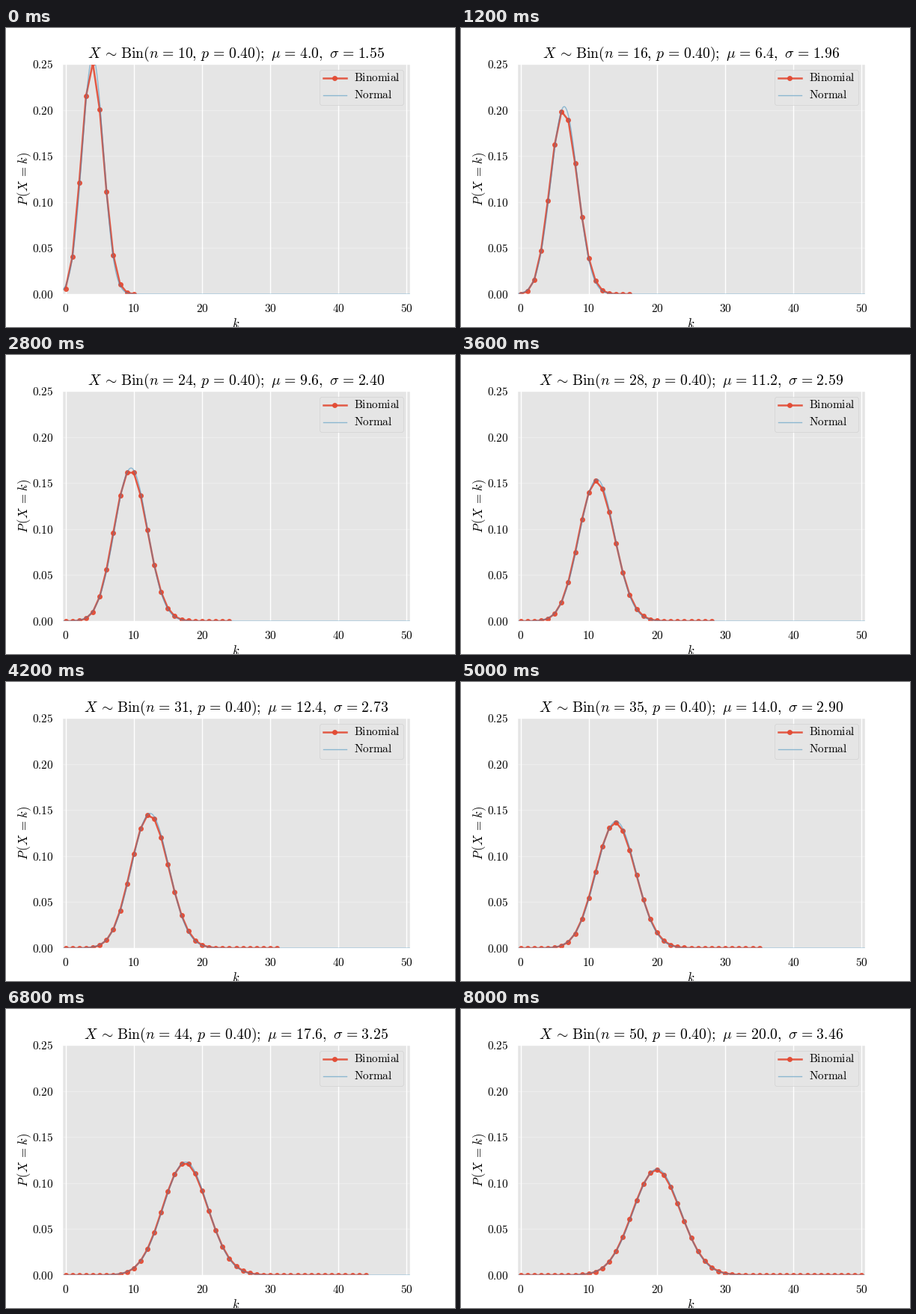
Recreate the animation shown at these times as a matplotlib script. Size 600x400 px, loop 8.2 s.

```python
from math import comb, pi, sqrt

import matplotlib.pyplot as plt
import numpy as np
from matplotlib.animation import FuncAnimation

P = 0.4
N_MIN, N_MAX = 10, 50
STEP_MS = 200
RED, BLUE, PANEL = "#E24A33", "#348ABD", "#E5E5E5"

plt.rcParams["mathtext.fontset"] = "cm"

# TeX-like spacing around relations and after slanted capitals
GAP = r"\hspace{0.117}"
EQ = f"{GAP}={GAP}"
X = r"X\hspace{0.09}"


def roman(text):
    return rf"$\mathrm{{{text}}}$"


def binomial(n):
    return [comb(n, k) * P**k * (1 - P) ** (n - k) for k in range(n + 1)]


def normal(x, mu, sigma):
    return np.exp(-(((x - mu) / sigma) ** 2) / 2) / (sigma * sqrt(2 * pi))


def title_text(n, mu, sigma):
    return (
        rf"${X}{GAP}\sim{GAP}\mathrm{{Bin}}(n{EQ}{n},\hspace{{0.18}}p{EQ}{P:.2f});"
        rf"\ \mu{EQ}{mu:.1f},\ \sigma{EQ}{sigma:.2f}$"
    )


fig, ax = plt.subplots(figsize=(6, 4), dpi=100)
ax.set_facecolor(PANEL)
ax.set_axisbelow(True)
ax.set(xlim=(-0.5, 50.5), ylim=(0, 0.25))
ax.spines[:].set(color="white", linewidth=1)

xticks = np.arange(0, 51, 10)
yticks = np.arange(0, 0.26, 0.05)
ax.set_xticks(xticks, [roman(f"{x}") for x in xticks])
ax.set_yticks(yticks, [roman(f"{y:.2f}") for y in yticks])
ax.tick_params(length=0, pad=8.5, labelsize=11)
ax.grid(axis="x", color="white", linewidth=1)
ax.grid(axis="y", color="white", linewidth=1, alpha=0.3)

ax.set_xlabel("$k$", fontsize=12, labelpad=2.8)
ax.set_ylabel(rf"$P\hspace{{0.15}}({X}{EQ}k)$", fontsize=12, labelpad=-1)
title = ax.set_title("", fontsize=14.2)

xs = np.linspace(-0.5, 50.5, 1000)
(dots,) = ax.plot([], [], "o-", color=RED, lw=1.8, ms=4, alpha=0.9, label=roman("Binomial"))
(curve,) = ax.plot([], [], color=BLUE, lw=1, alpha=0.5, label=roman("Normal"))
legend = ax.legend(
    loc="upper right", bbox_to_anchor=(0.998, 1), fontsize=11,
    borderpad=0.32, handletextpad=0.67, facecolor=PANEL,
)
legend.get_frame().set_linewidth(0.5)
for label in legend.get_texts():
    label.set_y(1.3)


def update(i):
    n = N_MIN + i
    mu, sigma = n * P, sqrt(n * P * (1 - P))
    dots.set_data(range(n + 1), binomial(n))
    curve.set_data(xs, normal(xs, mu, sigma))
    title.set_text(title_text(n, mu, sigma))
    return dots, curve, title


anim = FuncAnimation(fig, update, frames=N_MAX - N_MIN + 1, interval=STEP_MS, repeat=True, repeat_delay=0)
plt.show()
```
